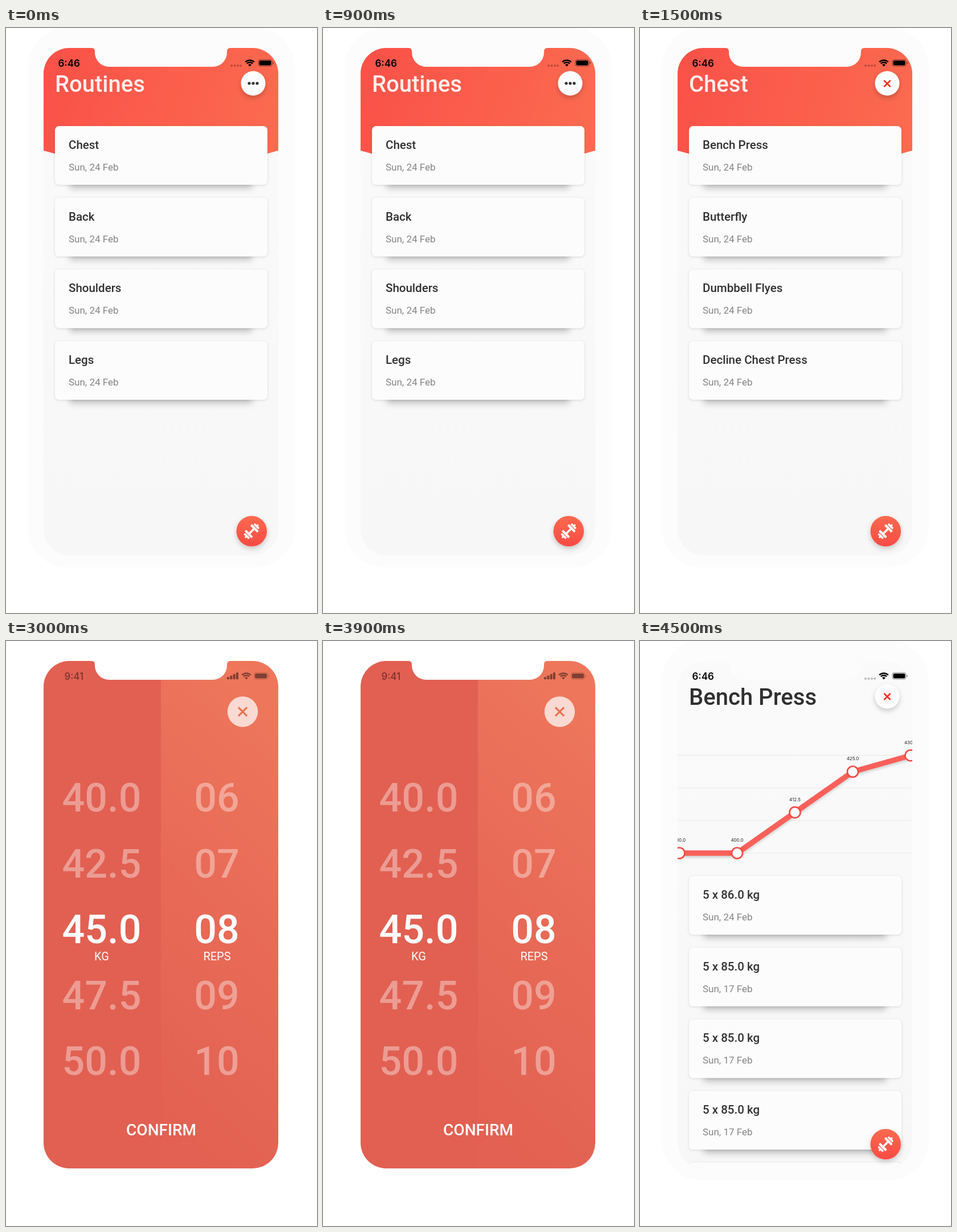
Write an HTML page that moves like this. It is 546 px wide and 1026 px high and loops after 6 s.

```html
<!DOCTYPE html>
<html lang="en">
<head>
<meta charset="utf-8">
<title>Workout tracker</title>
<style>
  html, body { margin: 0; width: 100%; height: 100%; overflow: hidden; background: #fff; }
  svg { display: block; width: 546px; height: 1026px; font-family: Roboto, sans-serif; }
  .scene { opacity: 0; animation: show 6s step-end infinite; }
  @keyframes show { 0% { opacity: 1; } 25%, 100% { opacity: 0; } }
  .title { font-size: 40px; font-weight: 500; }
  .name { font-size: 20.5px; font-weight: 500; fill: #303030; }
  .date { font-size: 17px; fill: #848484; }
  .clock { font: 600 17px Inter, sans-serif; }
  .label { font: 8px Inter, sans-serif; fill: #222; text-anchor: middle; }
  .picker { fill: #fff; text-anchor: middle; }
  .value { font-size: 70px; font-weight: 500; }
  .unit { font-size: 20px; }
  .confirm { font-size: 28px; font-weight: 500; }
</style>
</head>
<body>
<svg id="stage" viewBox="0 0 546 1026">
  <defs>
    <path id="screen" d="M66 80a45 45 0 0 1 45-45H150q6 0 6 6v2a25 25 0 0 0 25 25H363a25 25 0 0 0 25-25v-2q0-6 6-6H433a45 45 0 0 1 45 45V880a45 45 0 0 1-45 45H111a45 45 0 0 1-45-45Z"/>
    <clipPath id="clip"><use href="#screen"/></clipPath>
    <linearGradient id="header" gradientUnits="userSpaceOnUse" x1="66" y1="70" x2="478" y2="200">
      <stop stop-color="#fa5148"/><stop offset="1" stop-color="#fb6b50"/>
    </linearGradient>
    <linearGradient id="page" x2="0" y2="1">
      <stop stop-color="#fafafa"/><stop offset="1" stop-color="#f7f7f7"/>
    </linearGradient>
    <linearGradient id="fab" x2="0" y2="1">
      <stop stop-color="#fc6a50"/><stop offset="1" stop-color="#f84b43"/>
    </linearGradient>
    <linearGradient id="reps" x1=".6" x2=".4" y2="1">
      <stop stop-color="#ee775b"/><stop offset=".45" stop-color="#e86b57"/><stop offset="1" stop-color="#e26152"/>
    </linearGradient>
    <filter id="soft" x="-20%" y="-30%" width="140%" height="160%"><feGaussianBlur stdDeviation="6"/></filter>
    <filter id="tight" x="-10%" y="-10%" width="120%" height="120%"><feGaussianBlur stdDeviation="2"/></filter>
    <filter id="drop" x="-40%" y="-40%" width="180%" height="180%">
      <feDropShadow dx="0" dy="4" stdDeviation="4" flood-opacity=".2"/>
    </filter>
  </defs>
</svg>
<script>
const SCENE_SECONDS = 1.5, LOOP_SECONDS = 6;
const list = (items, draw) => items.map(draw).join('');
const text = (cls, x, y, value, attrs = '') =>
  `<text class="${cls}" x="${x}" y="${y}" ${attrs}>${value}</text>`;

function wifi(x, y) {
  const arc = r => {
    const d = r * Math.SQRT1_2;
    return `<path d="M${x - d} ${y - d}A${r} ${r} 0 0 1 ${x + d} ${y - d}" fill="none" stroke="currentColor" stroke-width="2.5"/>`;
  };
  return arc(11) + arc(7.2) +
    `<path d="M${x} ${y}l-2.9-2.9a4.1 4.1 0 0 1 5.8 0Z" fill="currentColor"/>`;
}

const battery = (x, y) =>
  `<rect x="${x + .5}" y="${y + .5}" width="24" height="11.5" rx="3.2" fill="none" stroke="currentColor" stroke-opacity=".45"/>
   <rect x="${x + 2}" y="${y + 2}" width="21" height="8.5" rx="2" fill="currentColor"/>
   <path d="M${x + 26} ${y + 4}q3 2.2 0 4.5Z" fill="currentColor" opacity=".5"/>`;

const statusBar = () =>
  text('clock', 91.5, 67.5, '6:46') +
  list([396, 401.5, 407, 412.2], x => `<circle cx="${x}" cy="66" r="2" opacity=".25"/>`) +
  wifi(428, 67.5) + battery(442.5, 55);

const cross = (x, y, r, color, width) =>
  `<path d="M${x - r} ${y - r}l${2 * r} ${2 * r}m0 ${-2 * r}l${-2 * r} ${2 * r}" stroke="${color}" stroke-width="${width}"/>`;

const button = icon =>
  `<circle cx="434" cy="97" r="21.5" fill="#fcfcfc" filter="url(#drop)"/>` + icon;
const closeButton = button(cross(434, 97.5, 5.6, '#f02a1d', 2.7));
const moreButton = button(list([427, 434, 441], x => `<circle cx="${x}" cy="97" r="2.6" fill="#333"/>`));

function card(y, name, date) {
  return `<rect x="112" y="${y + 25}" width="320" height="84" fill-opacity=".23" filter="url(#soft)"/>
    <rect x="86" y="${y + 1}" width="373" height="103" rx="7" fill-opacity=".13" filter="url(#tight)"/>
    <rect x="86" y="${y}" width="373" height="103" rx="7" fill="#fcfcfc"/>` +
    text('name', 110, y + 40, name) + text('date', 110, y + 78, date);
}
const cards = (top, rows) =>
  list(rows, ([name, date], i) => card(top + i * 125.7, name, date));

const fab = `<circle cx="431.3" cy="882.5" r="26.8" fill="url(#fab)" filter="url(#drop)"/>
  <g transform="translate(431.3 882.5) rotate(-45)" fill="#fff">
    <rect x="-7" y="-1.8" width="14" height="3.6"/>` +
    list([-1, 1], s => `<g transform="scale(${s} 1)">
      <rect x="5" y="-8.5" width="4.2" height="17" rx="1.2"/>
      <rect x="10.3" y="-6" width="3.6" height="12" rx="1.2"/>
      <rect x="13" y="-1.6" width="3.4" height="3.2" rx="1"/></g>`) + '</g>';

const phone = inner =>
  `<rect x="38" y="-1" width="469" height="947" rx="70" fill="#fcfcfc"/>
   <g clip-path="url(#clip)"><use href="#screen" fill="url(#page)"/>${inner}${fab}</g>` + statusBar();

const routine = (title, icon, names) => phone(
  `<path d="M66 30H478V215Q272 275 66 215Z" fill="url(#header)"/>` +
  text('title', 86, 112, title, 'fill="#fff" fill-opacity=".9"') + icon +
  cards(172, names.map(name => [name, 'Sun, 24 Feb'])));

function picker() {
  const column = (x, values) => list(values, (value, i) =>
    text('value', x, 299 + i * 115.5, value, i === 2 ? '' : 'fill-opacity=".38"'));
  const bars = list([4, 6.5, 9.3, 12], (h, i) =>
    `<rect x="${388 + i * 5.3}" y="${67.3 - h}" width="4" height="${h}" rx="1" fill="currentColor"/>`);
  return `<g clip-path="url(#clip)">
      <rect x="66" y="35" width="207" height="890" fill="#e16052"/>
      <rect x="272" y="35" width="206" height="890" fill="url(#reps)"/>
    </g>
    <g color="#000" opacity=".46">${text('clock', 102.5, 68, '9:41', 'style="font-weight:500"')}
      ${bars}${wifi(422, 67.5)}${battery(435, 55)}</g>
    <circle cx="415.5" cy="124" r="26.7" fill="#fad9d2"/>${cross(415.5, 124, 7.6, '#e9704f', 3)}
    <g class="picker">` +
      column(168, ['40.0', '42.5', '45.0', '47.5', '50.0']) +
      column(370, ['06', '07', '08', '09', '10']) +
      text('unit', 168, 560, 'KG') + text('unit', 370.5, 560, 'REPS') +
      text('confirm', 272.5, 867, 'CONFIRM') + '</g>';
}

function chart() {
  const points = [400, 400, 412.5, 425, 430].map((v, i) =>
    ({ v, x: 69 + i * 101.5, y: 372 - (v - 400) * 5.71 }));
  const line = points.map(p => `${p.x},${p.y}`).join(' ');
  return list([200.5, 257.7, 314.9, 372], y => `<path d="M66 ${y}H476" stroke="#e9e9e9"/>`) +
    `<polyline points="${line}" transform="translate(0 4)" fill="none" stroke="#000" stroke-opacity=".16" stroke-width="8" filter="url(#tight)"/>
     <polyline points="${line}" fill="none" stroke="#f9605a" stroke-width="9.5"/>` +
    list(points, p =>
      `<circle cx="${p.x}" cy="${p.y}" r="9.5" fill="#fff" stroke="#f54a42" stroke-width="2.6"/>` +
      text('label', p.x, p.y - 20, p.v.toFixed(1)));
}

const exercise = () => phone(
  text('title', 86, 112, 'Bench Press', 'fill="#303030"') + closeButton + chart() +
  cards(412, [
    ['5 x 86.0 kg', 'Sun, 24 Feb'],
    ...Array(4).fill(['5 x 85.0 kg', 'Sun, 17 Feb'])
  ]));

const scenes = [
  routine('Routines', moreButton, ['Chest', 'Back', 'Shoulders', 'Legs']),
  routine('Chest', closeButton, ['Bench Press', 'Butterfly', 'Dumbbell Flyes', 'Decline Chest Press']),
  picker(),
  exercise()
];
document.getElementById('stage').insertAdjacentHTML('beforeend', list(scenes, (scene, i) => {
  const delay = i ? i * SCENE_SECONDS - LOOP_SECONDS : 0;
  return `<g class="scene" style="animation-delay:${delay}s">${scene}</g>`;
}));
</script>
</body>
</html>
```
